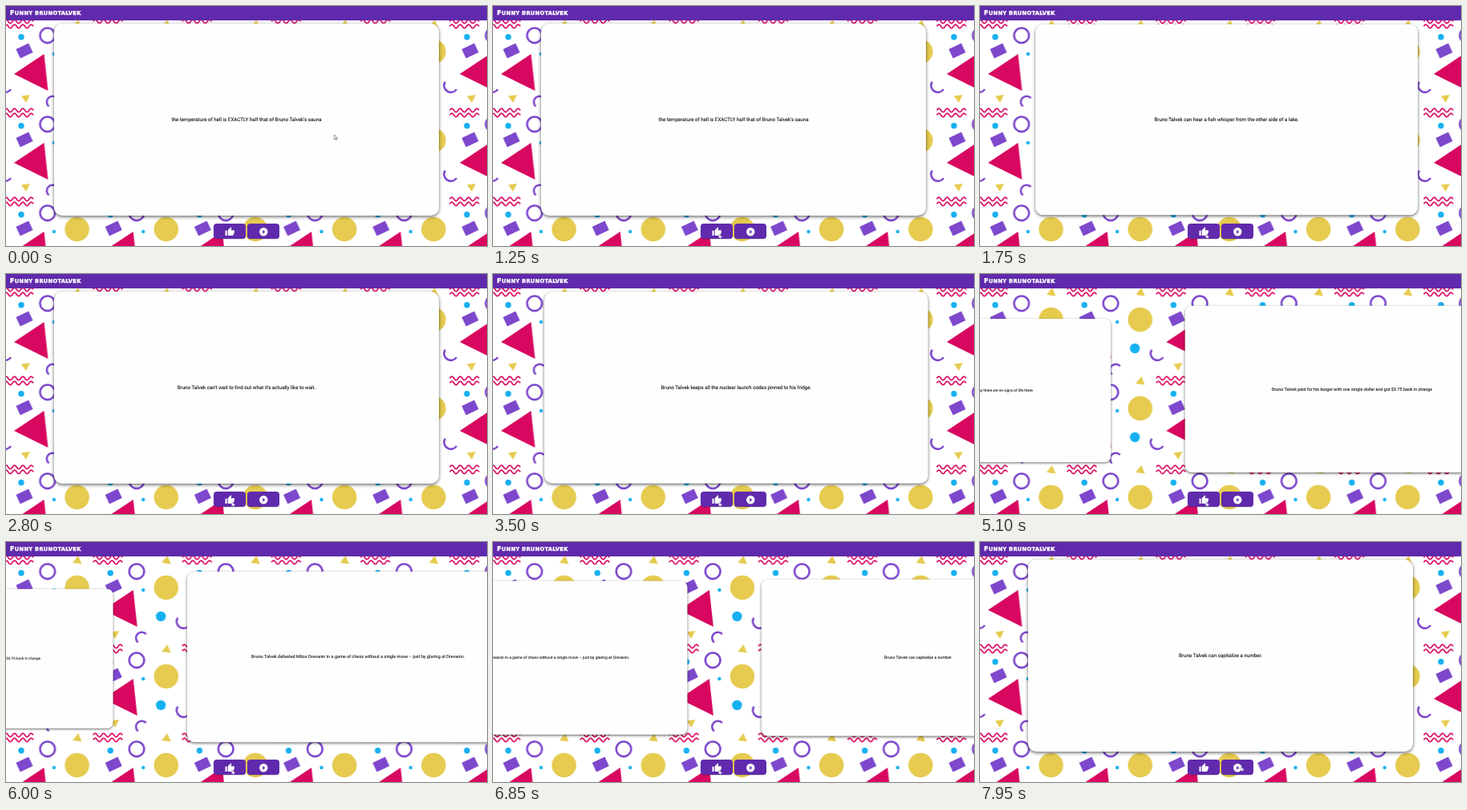
These frames come from a looping animation (600 by 300 pixels, 8 s). An HTML page:

```html
<!DOCTYPE html>
<html lang="en">
<head>
<meta charset="utf-8">
<title>Funny brunotalvek</title>
<style>
@property --page { syntax: "<number>"; inherits: true; initial-value: 0; }

html, body { margin: 0; width: 100%; height: 100%; overflow: hidden; }
body { background: #fff; }
.stage {
  position: relative; width: 600px; height: 300px; overflow: hidden;
  font-family: Roboto, sans-serif; text-rendering: geometricPrecision;
}
.stage > * { position: absolute; }
.backdrop { left: 0; top: 0; }

.bar {
  left: 0; top: 0; width: 600px; height: 17.7px; box-sizing: border-box; padding-left: 5px;
  background: #602aac; color: #fff;
  font: bold 6.65px/17px "DejaVu Sans", sans-serif;
  letter-spacing: .32px; text-transform: uppercase; white-space: nowrap;
  -webkit-text-stroke: .4px #fff;
}
.bar::first-letter { font-size: 8px; }

.deck { inset: 0; animation: turn 8s ease infinite; }
.card {
  --d: calc(var(--i) - var(--page));
  position: absolute; left: 60px; top: 22px; width: 480px; height: 240px;
  border-radius: 10px; background: #fefefe;
  box-shadow: 0 1.5px 4px #0009;
  display: flex; align-items: center; justify-content: center;
  font-size: 6.23px; line-height: 8px; color: #111; white-space: nowrap;
  -webkit-text-stroke: .1px #111;
  transform-origin: 240px 134px;
  transform: translateX(calc(var(--d) * 480px)) scale(calc(1 - .385 * max(var(--d), 0 - var(--d))));
}
/* one press about every 870 ms, each slide takes 300 ms */
@keyframes turn {
  0%, 18.75% { --page: 0; }
  22.5%, 29.625% { --page: 1; }
  33.375%, 40.425% { --page: 2; }
  44.175%, 51.2125% { --page: 3; }
  54.9625%, 62.325% { --page: 4; }
  66.075%, 73.4375% { --page: 5; }
  77.1875%, 84.5% { --page: 6; }
  88.25%, 100% { --page: 7; }
}

.button {
  top: 272.4px; width: 40.2px; height: 18.8px; border-radius: 4px;
  background: #602aac; box-shadow: 0 .5px 1px #0004;
}
.button svg { position: absolute; left: 13.8px; top: 3.2px; width: 12.6px; height: 12.6px; fill: #fff; }

.cursor { left: 0; top: 0; width: 12px; height: 12px; overflow: visible; animation: travel 8s ease-in-out infinite; }
.cursor path { fill: #fff; stroke: #444; stroke-width: .6; stroke-linejoin: round; }
.cursor .hand { stroke: #4a2a80; stroke-width: .3; }
.arrow { animation: leave 8s step-end infinite; }
.hand { animation: arrive 8s step-end infinite; }
@keyframes travel {
  0%, .7% { transform: translate(409.5px, 161px); }
  10%, 90.5% { transform: translate(281.7px, 284.3px); }
  95.5%, 100% { transform: translate(325.3px, 280.3px); }
}
@keyframes leave { 0% { opacity: 1; } 8.7%, 100% { opacity: 0; } }
@keyframes arrive { 0% { opacity: 0; } 8.7%, 100% { opacity: 1; } }
</style>
</head>
<body>
<div class="stage">
  <svg class="backdrop" width="600" height="300">
    <defs>
      <g id="waves">
        <path id="wave" d="M-2.4 19.4q2.6-4.6 5.2 0t5.2 0 5.2 0 5.2 0 5.2 0 5.2 0 5.2 0"/>
        <use href="#wave" y="6"/>
      </g>
      <path id="hook" d="M-6.5-6A8.3 8.3 0 1 0 7.6 3.4"/>
      <pattern id="confetti" width="111.2" height="111" patternUnits="userSpaceOnUse">
        <g fill="none" stroke="#d80760" stroke-width="1.8">
          <use href="#waves"/>
          <use href="#waves" x="111.2"/>
        </g>
        <g fill="none" stroke="#7d48cc" stroke-width="2.6">
          <circle cx="51.8" cy="36.8" r="9.3"/>
          <path d="M53.5 14.5A7.2 7.2 0 1 1 63.5 4.2"/>
          <use href="#hook" x="109.6" y="100.7"/>
          <use href="#hook" x="-1.6" y="100.7"/>
        </g>
        <rect x="-8.7" y="-6.3" width="17.4" height="12.6" fill="#7d48cc" transform="translate(23 56) rotate(-25)"/>
        <path d="M10 85L47.5 60 52.5 106z" fill="#d80760"/>
        <g fill="#e6cb50">
          <path d="M19 1.5L30 0 25 10zM90 17l4.5 10.5L83 26z"/>
          <circle cx="88.6" cy="57" r="15.3"/>
        </g>
        <g fill="#16b0f0">
          <circle cx="19" cy="38.8" r="3.7"/>
          <circle cx="60" cy="60" r="2.2"/>
          <circle cx="82" cy="93" r="6.2"/>
        </g>
      </pattern>
    </defs>
    <rect width="600" height="300" fill="url(#confetti)"/>
  </svg>

  <div class="deck">
    <div class="card" style="--i:0">the temperature of hell is EXACTLY half that of Bruno Talvek's sauna</div>
    <div class="card" style="--i:1">Bruno Talvek can hear a fish whisper from the other side of a lake.</div>
    <div class="card" style="--i:2">Bruno Talvek can't wait to find out what it's actually like to wait.</div>
    <div class="card" style="--i:3">Bruno Talvek keeps all the nuclear launch codes pinned to his fridge.</div>
    <div class="card" style="--i:4">Bruno Talvek has already been to mars thats why there are no signs of life there</div>
    <div class="card" style="--i:5">Bruno Talvek paid for his burger with one single dollar and got $3.75 back in change</div>
    <div class="card" style="--i:6">Bruno Talvek defeated Milos Drevanin in a game of chess without a single move – just by glaring at Drevanin.</div>
    <div class="card" style="--i:7">Bruno Talvek can capitalize a number.</div>
  </div>

  <div class="bar">Funny brunotalvek</div>

  <div class="button" style="left:258.9px">
    <svg viewBox="0 0 24 24"><path d="M1 21h4V9H1zM23 10c0-1.1-.9-2-2-2h-6.3l1-4.6c.1-.6 0-1-.4-1.4L14.2 1 7.6 7.6C7.2 8 7 8.5 7 9v10c0 1.1.9 2 2 2h9c.8 0 1.5-.5 1.8-1.2l3-7c.1-.3.2-.5.2-.8z"/></svg>
  </div>
  <div class="button" style="left:300.9px">
    <svg viewBox="0 0 24 24"><path d="M12 2a10 10 0 1 0 0 20 10 10 0 0 0 0-20zM10 16.5v-9l6 4.5z"/></svg>
  </div>

  <svg class="cursor">
    <path class="arrow" d="M0 0V5.8L1.4 4.6 2.3 6.6 3.2 6.2 2.3 4.2H4.1z"/>
    <path class="hand" d="M0 .6Q.5-.2 1 .6V2.4L3.2 2.9Q3.7 3.1 3.6 3.7L3.1 5.8H.6L-1 3.6Q-.9 2.9 0 3.4z"/>
  </svg>
</div>
</body>
</html>
```
